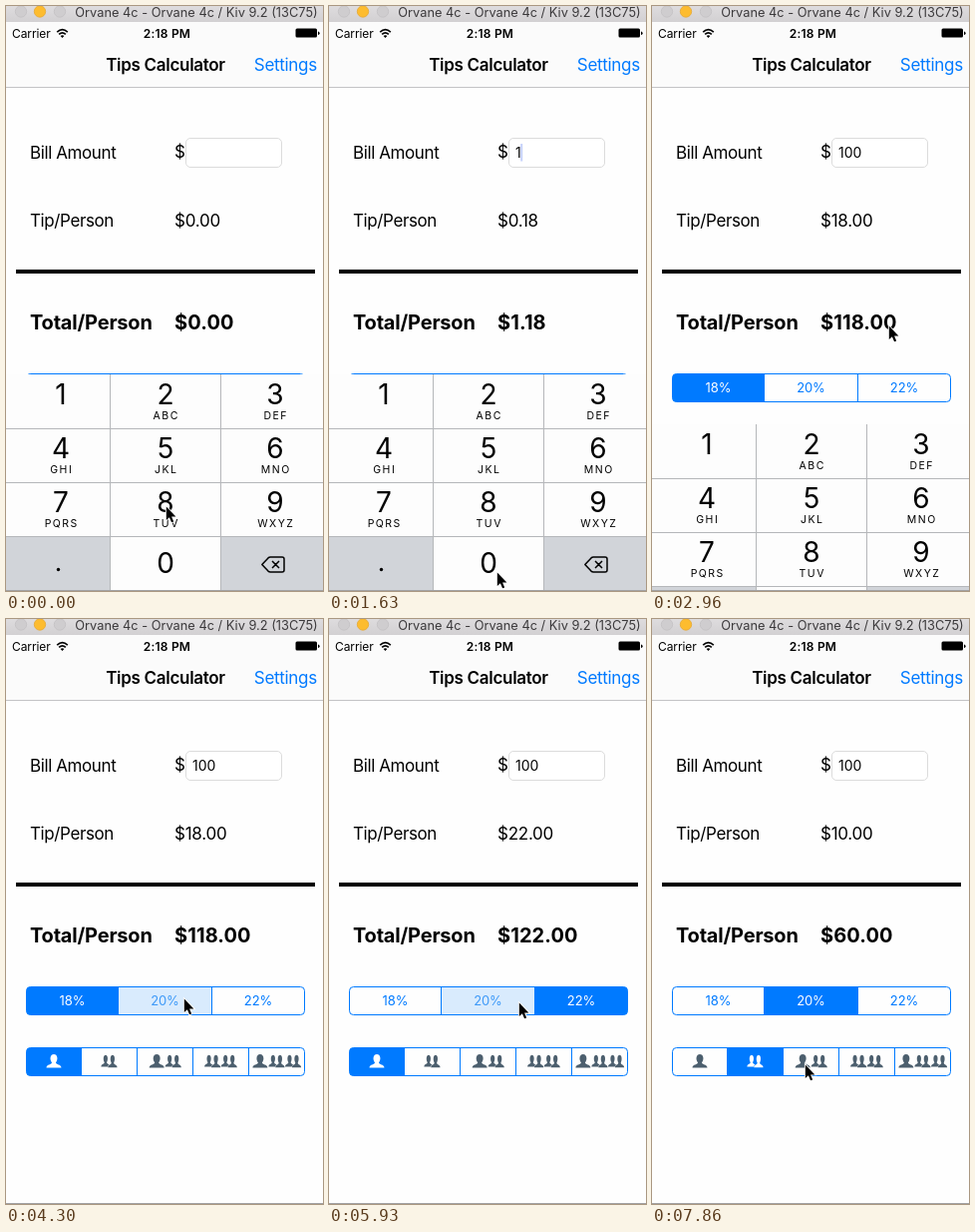
An HTML page for the animation above (8000 ms loop, 318 by 586 pixels).

```html
<!DOCTYPE html>
<html lang="en">
<head>
<meta charset="utf-8">
<title>Tips Calculator</title>
<style>
  html, body { margin: 0; width: 100%; height: 100%; overflow: hidden; background: #fefefe; }
  svg { display: block; width: 318px; height: 586px; font-family: Inter, Roboto, sans-serif; }
  .body { font-size: 17px; letter-spacing: -.4px; }
  .nav { font-size: 17px; letter-spacing: -.3px; }
  .bold { font-weight: 600; }
  .total { font-size: 20px; font-weight: 700; letter-spacing: -.2px; }
  #tip { letter-spacing: -.25px; }
  #total { letter-spacing: .1px; }
  .mid { text-anchor: middle; }
  .blue { fill: #007aff; }
  .digit { font-size: 28px; text-anchor: middle; }
  .letters { font-size: 10.5px; letter-spacing: 1.5px; text-anchor: middle; }
  .rule { stroke: #b5b7ba; fill: none; }
</style>
</head>
<body>
<svg viewBox="0 0 318 586">
  <defs>
    <linearGradient id="bar" x2="0" y2="1">
      <stop stop-color="#dedcde"/><stop offset="1" stop-color="#d2d0d2"/>
    </linearGradient>
  </defs>
  <rect width="318" height="586" fill="#fefefe"/>
  <rect y="16" width="318" height="65" fill="#fbfbfb"/>
  <path d="M0 81.5H318" stroke="#c4c4c6"/>

  <rect width="318" height="16" fill="url(#bar)"/>
  <g stroke-width=".8">
    <circle cx="15" cy="5.5" r="5.7" fill="#cfcdcf" stroke="#c3c1c3"/>
    <circle cx="34" cy="5.5" r="5.7" fill="#fdbc2f" stroke="#e5a833"/>
    <circle cx="54" cy="5.5" r="5.7" fill="#cfcdcf" stroke="#c3c1c3"/>
  </g>
  <text class="mid" x="191" y="10.5" font-size="12.8" fill="#3c3a3c">Orvane 4c - Orvane 4c / Kiv 9.2 (13C75)</text>

  <text x="6" y="31.5" font-size="12" letter-spacing="-.1">Carrier</text>
  <g fill="none" stroke="#000" stroke-width="1.7">
    <path d="M51.2 26.2Q56.5 21.2 61.8 26.2M53.2 28.4Q56.5 25.2 59.8 28.4"/>
  </g>
  <path d="M56.5 32L54.6 30Q56.5 28.4 58.4 30Z"/>
  <text class="mid bold" x="161.5" y="31.5" font-size="12" letter-spacing=".2">2:18 PM</text>
  <rect x="290.5" y="22.5" width="21.5" height="9" rx="1.5"/>
  <path d="M313 25.5q1.6 .3 1.6 1.8t-1.6 1.8z"/>

  <text class="nav bold mid" x="160" y="65">Tips Calculator</text>
  <text class="nav blue" x="248.8" y="65">Settings</text>

  <text class="body" x="24" y="152.7">Bill Amount</text>
  <text class="body" x="169" y="151.8">$</text>
  <rect x="180.5" y="132.5" width="96" height="29" rx="4.5" fill="#fff" stroke="#dcdcdc"/>
  <text id="bill" x="187" y="151.8" font-size="14"></text>
  <rect id="caret" y="138" width="2" height="17.5" fill="#4168ee"/>

  <text class="body" x="24" y="220.7">Tip/Person</text>
  <text class="body" x="169" y="220.7" id="tip"></text>
  <rect x="10" y="264" width="300" height="4"/>
  <text class="total" x="24" y="324">Total/Person</text>
  <text class="total" x="169" y="324" id="total"></text>

  <g id="rates"></g>
  <g id="people"></g>
  <g id="pad"></g>
  <rect y="585" width="318" height="1" fill="#a2a2a4"/>
  <g id="pointer">
    <path d="M0 0V15.3L3.5 12L6 17.8L8.4 16.8L6 11.2H10.9Z" transform="translate(.8 .6) scale(.88)"
      stroke="#fff" stroke-width="2" paint-order="stroke"/>
  </g>
</svg>
<script>
const $ = id => document.getElementById(id);
const LOOP = 8000, STEPS = 54;
const BLUE = '#007aff', PRESSED = '#d9ebfd', SLATE = '#4c5f6e';

// Segmented controls
const BUST = 'M-7.5 6.5C-7.3 2.8-2 3.8-2 1.3C-4.6-2-3.6-7 0-7S4.6-2 2 1.3C2 3.8 7.3 2.8 7.5 6.5Z';
const bust = (x, y, sx, sy, edge = 0) =>
  `<path d="${BUST}" transform="translate(${x} ${y}) scale(${sx} ${sy})" fill="var(--ink)" stroke="var(--bg)" stroke-width="${edge}" paint-order="stroke"/>`;
const single = x => bust(x, 443, 1, 1);
const pair = x => bust(x - 3.6, 442.8, .6, .88) + bust(x + 3.4, 443.3, .62, .92, 1.2);

function crowd(n, cx) {
  const count = Math.ceil(n / 2);
  let out = '';
  for (let i = 0; i < count; i++) {
    const x = cx + (i - (count - 1) / 2) * 16.6;
    out += n % 2 && i === 0 ? single(x) : pair(x);
  }
  return out;
}

function buildSegments(group, y, count, content) {
  const r = 4, edge = i => i ? Math.round(20 + i * 280 / count) - .5 : 20.5;
  let out = '', dividers = '';
  for (let i = 0; i < count; i++) {
    const x = edge(i), w = edge(i + 1) - x, a = i ? 0 : r, b = i === count - 1 ? r : 0;
    out += `<g class="seg"><path fill="var(--bg)" d="M${x + a} ${y}h${w - a - b}q${b} 0 ${b} ${b}v${28 - 2 * b}q0 ${b} ${-b} ${b}` +
      `h${a + b - w}q${-a} 0 ${-a} ${-a}v${2 * a - 28}q0 ${-a} ${a} ${-a}z"/>${content(i, x + w / 2)}</g>`;
    if (i) dividers += `M${x} ${y}v28`;
  }
  group.innerHTML = out +
    `<rect x="20.5" y="${y}" width="279" height="28" rx="${r}" fill="none" stroke="${BLUE}"/><path d="${dividers}" stroke="${BLUE}"/>`;
}

function paintSegments(group, ink, selected, pressed, press = 1) {
  group.querySelectorAll('.seg').forEach((seg, i) => {
    const on = i === selected, down = i === pressed;
    seg.style.setProperty('--bg', on ? BLUE : down ? (press < 1 ? '#e8f3fe' : PRESSED) : '#fefefe');
    seg.style.setProperty('--ink', on ? '#fff' : down && ink === BLUE ? '#3d99f8' : ink);
  });
}

const RATES = [18, 20, 22];
buildSegments($('rates'), 368.5, 3, (i, x) =>
  `<text class="mid" x="${x}" y="387.2" font-size="13" letter-spacing="-.1" fill="var(--ink)">${RATES[i]}%</text>`);
buildSegments($('people'), 429.5, 5, (i, x) => crowd(i + 1, x));

// Number pad
const COLS = [55, 160, 270];
const LETTERS = ['', 'ABC', 'DEF', 'GHI', 'JKL', 'MNO', 'PQRS', 'TUV', 'WXYZ'];
const GREY = '#d1d4d9';

function buildPad() {
  let out = `<rect y="369" width="318" height="217" fill="#fdfdfd"/>
    <rect y="531" width="104" height="55" fill="${GREY}"/><rect x="216" y="531" width="102" height="55" fill="${GREY}"/>
    <rect id="key1" y="369" width="104" height="54" fill="${GREY}"/>
    <rect id="key0" x="105" y="531" width="110" height="55" fill="${GREY}"/>
    <path class="rule" d="M104.5 369V586M215.5 369V586M0 423.5H318M0 477.5H318M0 531.5H318"/>`;
  LETTERS.forEach((word, i) => {
    const x = COLS[i % 3], y = 369 + Math.floor(i / 3) * 54;
    out += `<text class="digit" x="${x}" y="${y + 30}">${i + 1}</text>
      <text class="letters" x="${x + .75}" y="${y + 45}">${word}</text>`;
  });
  $('pad').innerHTML = out + `<text class="digit" x="160" y="568">0</text>
    <circle cx="52.5" cy="564.5" r="1.7"/>
    <path d="M256.8 559.5L263 552.9Q264 552 265.2 552H277Q279 552 279 554V565Q279 567 277 567H265.2Q264 567 263 566.1ZM267 556l7 7m0-7l-7 7"
      fill="none" stroke="#000" stroke-width="1.5" stroke-linejoin="round"/>`;
}
buildPad();

// Pointer stops: step, x, y
const PATH = [
  [0, 160, 501], [6, 89, 397], [8, 89, 397], [11, 168, 567], [16, 168, 567],
  [19, 237, 320], [24, 237, 320], [28, 178, 380], [31, 178, 380], [34, 252, 382],
  [36, 252, 382], [39, 190, 384], [41, 190, 384], [47, 109, 443], [51, 109, 443], [53, 153, 446]
];

function pointerAt(k) {
  const n = Math.max(1, PATH.findIndex(p => p[0] >= k));
  const [k0, x0, y0] = PATH[n - 1], [k1, x1, y1] = PATH[n];
  const u = (k - k0) / (k1 - k0), e = u * u * (3 - 2 * u);
  return [x0 + (x1 - x0) * e, y0 + (y1 - y0) * e];
}

// Value of the last [step, value] pair already reached
const at = (track, k) => track.filter(p => p[0] <= k).pop()[1];

const BILL = [[0, ''], [8, '1'], [13, '10'], [15, '100']];
const CARET = [[0, 0], [2, 1], [5, .4], [6, 0], [8, 1], [11, .3], [12, 0], [13, 1], [18, .4], [19, 0]];
const RATE = [[0, 0], [30, 1], [35, 2], [41, 1]];
const RATE_DOWN = [[0, -1], [29, 1], [30, -1], [34, 2], [35, -1], [40, 1], [41, -1]];
const PARTY = [[0, 0], [50, 1]];
const PARTY_DOWN = [[0, -1], [48, 1], [50, -1]];
const SLIDE = [[0, 0], [20, 50], [21, 180], [22, 211], [23, 220]];
const KEY1 = [[0, 0], [7, 1], [8, 0]];
const KEY0 = [[0, 0], [12, 1], [13, 0], [14, 1], [15, 0]];

const money = v => '$' + v.toFixed(2);
let last = -1;

function draw(k) {
  const text = at(BILL, k), bill = Number(text), rate = at(RATE, k), party = at(PARTY, k);
  const tip = bill * RATES[rate] / 100;
  $('bill').textContent = text;
  $('tip').textContent = money(tip / (party + 1));
  $('total').textContent = money((bill + tip) / (party + 1));
  $('caret').setAttribute('x', 187 + (text ? $('bill').getComputedTextLength() - .5 : 0));
  $('caret').setAttribute('opacity', at(CARET, k));
  paintSegments($('rates'), BLUE, rate, at(RATE_DOWN, k));
  paintSegments($('people'), SLATE, party, at(PARTY_DOWN, k), k === 48 ? .5 : 1);
  $('pad').setAttribute('transform', `translate(0 ${at(SLIDE, k)})`);
  $('key1').setAttribute('opacity', at(KEY1, k));
  $('key0').setAttribute('opacity', at(KEY0, k));
  $('pointer').setAttribute('transform', `translate(${pointerAt(k)})`);
}

function tick() {
  const t = performance.now() % LOOP;
  const k = Math.floor((t + 8) * STEPS / LOOP) % STEPS;
  if (k !== last) draw(last = k);
  requestAnimationFrame(tick);
}
tick();
</script>
</body>
</html>
```
